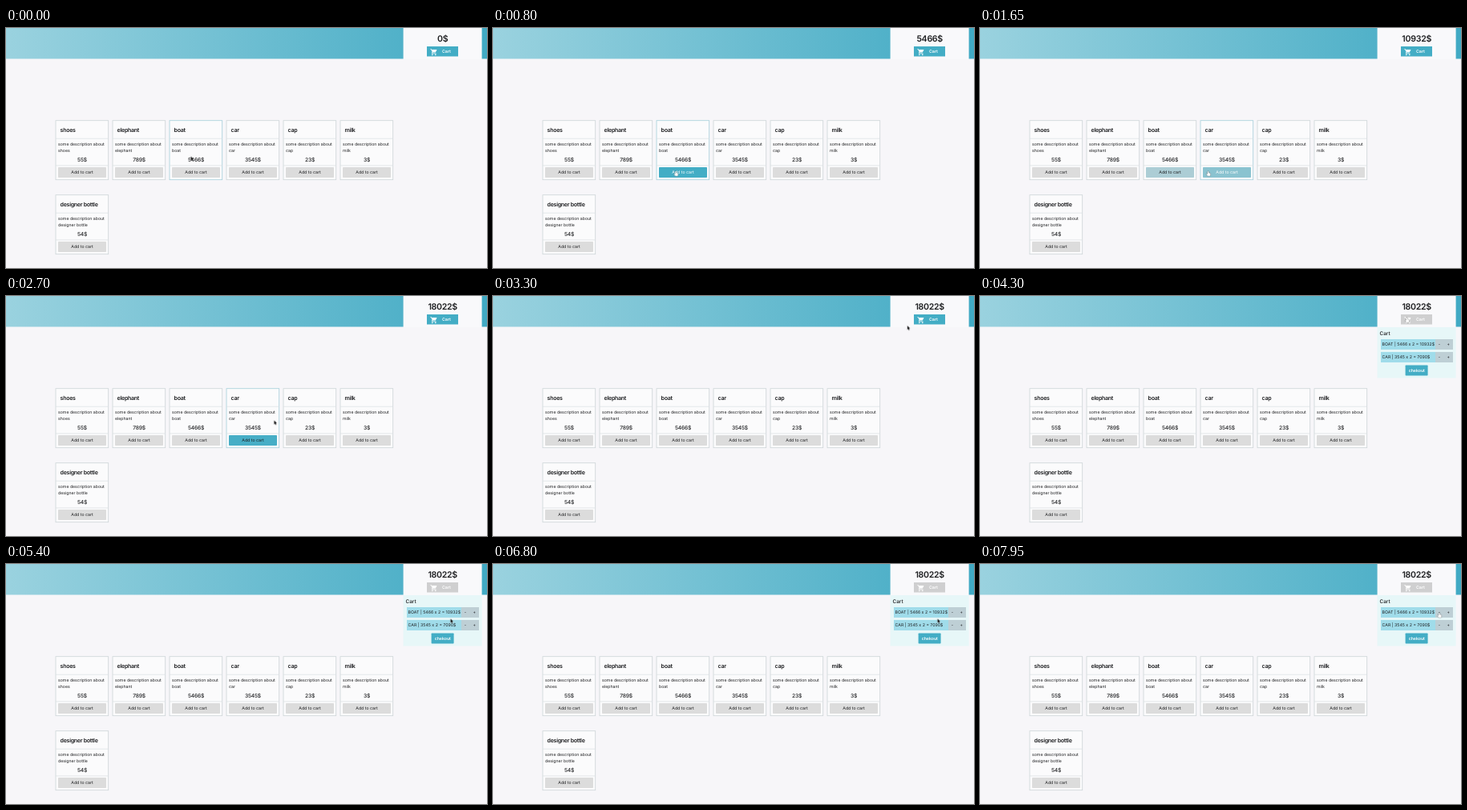
Animation, 600 px wide and 300 px high, one loop 8000 ms. Source, as an HTML page:

```html
<!DOCTYPE html>
<html lang="en">
<head>
<meta charset="utf-8">
<title>Shop cart</title>
<style>
  html, body { margin: 0; width: 100%; height: 100%; overflow: hidden; background: #f7f6f9; }
  svg { display: block; width: 600px; height: 300px; font-family: Inter, "Open Sans", sans-serif; text-rendering: geometricPrecision; }
  text { fill: #1d1e20; font-size: 5.2px; }
  .title { font-size: 7.1px; font-weight: 600; letter-spacing: -.32px; }
  .price { font-size: 6.7px; font-weight: 500; letter-spacing: -.2px; }
  .total { font-size: 10.6px; font-weight: 600; letter-spacing: -.3px; }
  .heading { font-size: 6.4px; font-weight: 500; }
  .row { font-size: 5.25px; }
  .white { fill: #fff; font-weight: 600; }
  .mid { text-anchor: middle; }
</style>
</head>
<body>
<svg id="stage" viewBox="0 0 600 300">
  <defs>
    <linearGradient id="sky"><stop stop-color="#9ad2df"/><stop offset="1" stop-color="#41aac4"/></linearGradient>
  </defs>
</svg>
<script>
const LOOP = 8000, FADE = 500;
const TEAL = '#43adc5', GREY = '#dcdcdc', INK = '#1d1e20', EDGE = '#cdd5d7';
const stage = document.getElementById('stage');

const products = [
  ['shoes', 55], ['elephant', 789], ['boat', 5466], ['car', 3545],
  ['cap', 23], ['milk', 3], ['designer bottle', 54]
];
const [, , boat, car] = products;
const clicks = [[600, boat], [1050, boat], [1900, car], [2400, car]];
const OPEN = 3950;

// When the pointer rests on something clickable
const over = { boat: [90, 1450], car: [1495, 2680], cart: [3420, 4560], minus: [7570, LOOP] };

function add(parent, tag, attrs, content) {
  const el = document.createElementNS('http://www.w3.org/2000/svg', tag);
  for (const key in attrs) el.setAttribute(key, attrs[key]);
  if (content !== undefined) el.textContent = content;
  return parent.appendChild(el);
}
const box = (parent, x, y, width, height, fill, more) =>
  add(parent, 'rect', { x, y, width, height, fill, ...more });
const label = (parent, x, y, content, cls = '') =>
  add(parent, 'text', { x, y, class: cls }, content);

// steps: [ms, value, easing towards the next step]
function track(el, prop, steps) {
  const all = [[0, steps[0][1]], ...steps, [LOOP, steps[steps.length - 1][1]]];
  const frames = all.map(([ms, value, easing = 'linear']) =>
    ({ offset: Math.min(Math.max(ms / LOOP, 0), 1), [prop]: value, easing }));
  el.animate(frames, { duration: LOOP, iterations: Infinity });
}

// Fades a property in on entering and back on leaving; a fade of 0 is a hard change.
function hover(el, prop, rest, active, [enter, leave], fade = FADE) {
  track(el, prop, [
    [enter, rest, 'ease'], [enter + fade, active],
    [leave, active, 'ease'], [leave + fade, rest]
  ]);
}
const show = (el, from, to) => hover(el, 'opacity', 0, 1, [from, to], 0);

// Header
box(stage, 0, 0, 600, 38.5, 'url(#sky)');
box(stage, 495.6, 0, 98, 39, '#f9f9fb');
let sum = 0;
[[0, ['', 0]], ...clicks].forEach(([ms, [, price]], i) => {
  sum += price;
  const until = i < clicks.length ? clicks[i][0] : LOOP;
  show(label(stage, 544.7, 16.5, sum + '$', 'total mid'), ms, until);
});

const cartButton = box(stage, 525, 23, 39, 12.5, TEAL);
hover(cartButton, 'fill', TEAL, '#cfcfd0', [over.cart[0], LOOP]);
const icon = add(stage, 'g', { transform: 'translate(529 25.4) scale(.4)', fill: '#fff' });
add(icon, 'path', { d: 'M1 2h3.3l1 2H20q1.7 0 .9 1.5l-3.6 6.5q-.6 1-1.8 1H8.1L7 15h12v2H7q-2.8-.2-1.8-3l1.4-2.4L3 4H1z' });
for (const cx of [7, 17]) add(icon, 'circle', { cx, cy: 20, r: 2 });
label(stage, 549.4, 31.2, 'Cart', 'white mid');

// Products
products.forEach(([name, price], i) => {
  const x = 62 + 71 * (i % 6), y = 115.7 + 93 * Math.floor(i / 6);
  const card = add(stage, 'g', { transform: `translate(${x} ${y})` });
  const frame = box(card, 0, 0, 65.7, 74, '#fbfbfc', { stroke: EDGE, 'stroke-width': .8 });
  add(card, 'path', { d: 'M0 22.5H65.7M0 56.2H65.7', stroke: '#d8dfe1', 'stroke-width': .7 });
  label(card, 5.6, 14.2, name, 'title');
  label(card, 3, 31.2, 'some description about');
  label(card, 3, 38.9, name);
  label(card, 33, 51.7, price + '$', 'price mid');
  const button = box(card, 3, 58.4, 60, 13, GREY, { rx: .8 });
  const text = label(card, 33, 66.8, 'Add to cart', 'mid');
  const span = over[name];
  if (!span) return;
  hover(frame, 'stroke', EDGE, '#a5cfdb', [span[0] - 120, span[1] + 120], 30);
  hover(button, 'fill', GREY, TEAL, span);
  hover(text, 'fill', INK, '#fff', span, 0);
});

// Cart panel
const panel = add(stage, 'g', {});
box(panel, 495.6, 39, 98, 63.5, '#e7f7f8');
label(panel, 498.5, 48.8, 'Cart', 'heading');
[boat, car].forEach(([name, price], i) => {
  const y = 54 + 16 * i;
  box(panel, 500, y, 68, 13, '#a0dcea');
  box(panel, 568, y, 22, 13, '#becfd5');
  label(panel, 501.6, y + 8.4, `${name.toUpperCase()} | ${price} x 2 = ${price * 2}$`, 'row');
  label(panel, 573, y + 8.2, '-', 'mid');
  label(panel, 584.2, y + 8.4, '+', 'mid');
});
box(panel, 530.6, 86.5, 28, 13, TEAL, { rx: .8 });
label(panel, 544.8, 94.9, 'chekout', 'white mid');
show(panel, OPEN, LOOP);

// Pointer
const pointer = add(stage, 'g', {});
const shape = (d, fill, stroke) => add(pointer, 'path',
  { d, fill, stroke, 'stroke-width': .55, 'paint-order': 'stroke', transform: 'scale(.88)' });
const arrow = shape('M0 0V5.6L1.3 4.4 2.2 6.4 3.1 6 2.2 4.1H4Z', '#111', '#fff');
const hand = shape('M-.8.6Q0-.5.8.6V2.6L2.8 3Q3.6 3.3 3.4 4.4L2.8 6.8H-.8L-2.6 4.2Q-2.3 3.2-.8 4.2Z', '#fff', '#222');

// Each leg: leaves, arrives, x, y; the pointer rests between legs.
const legs = [
  [0, 0, 230.5, 160.5],
  [50, 250, 228, 179],
  [1350, 1600, 284.5, 179],
  [1650, 1850, 299, 178.5],
  [2620, 3480, 532.5, 27],
  [4350, 5250, 554.5, 68.5],
  [7350, 7800, 572.8, 61]
];
const at = ([, , x, y]) => `translate(${x}px, ${y}px)`;
track(pointer, 'transform', legs.flatMap((leg, i) =>
  [[leg[0], at(legs[Math.max(i - 1, 0)]), 'ease-out'], [leg[1], at(leg)]]));

const toggles = first => Object.values(over).flatMap(([enter, leave]) =>
  [[enter, first], [enter, 1 - first], [leave, 1 - first], [leave, first]]);
track(arrow, 'opacity', toggles(1));
track(hand, 'opacity', toggles(0));
</script>
</body>
</html>
```
